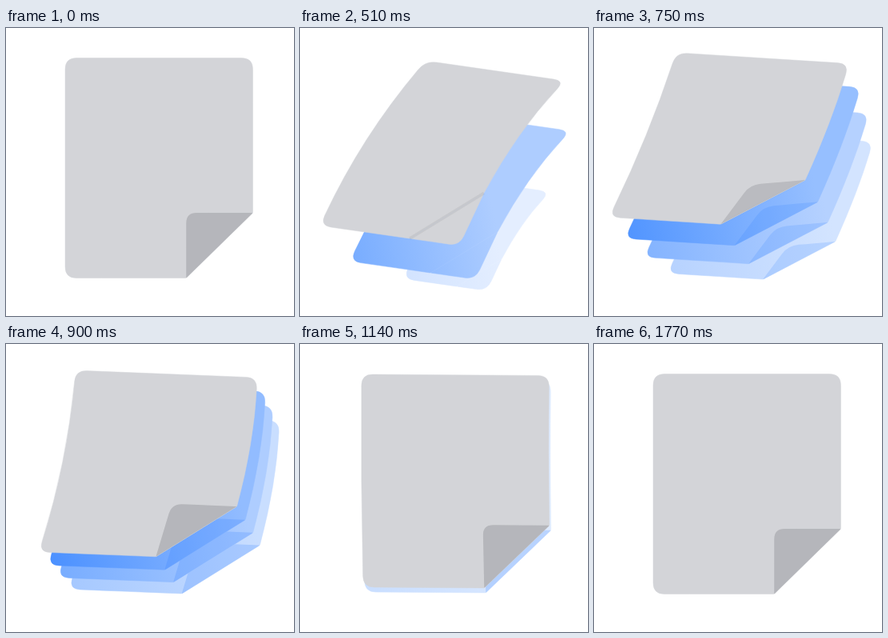
An HTML page with a canvas for the animation above (1800 ms loop, 360x360 px).

```html
<!DOCTYPE html>
<html lang="en">
<head>
<meta charset="utf-8">
<title>Peeling note</title>
<style>
  html, body { margin: 0; width: 100%; height: 100%; overflow: hidden; background: #fff; }
  canvas { display: block; width: 360px; height: 360px; }
</style>
</head>
<body>
<canvas id="stage"></canvas>
<script>
const LOOP = 1800, STEP = 30, COPIES = 3;
const GREY = [211, 212, 216], BLUE = [74, 144, 255];
const PIVOT = [170, 133];            // copies shrink around this point
const FOLD = { u: 0.645, v: 0.704 }; // where the peeled corner meets the edges

const canvas = document.getElementById('stage');
const ctx = canvas.getContext('2d');
const dpr = window.devicePixelRatio || 1;
canvas.width = canvas.height = 360 * dpr;
ctx.scale(dpr, dpr);

// A pose: three page corners, edge bend, peel of the fourth corner,
// and how the copies trail: gap, shrink and loss of colour per copy
const pose = (tl, tr, bl, bend, peel, gap, shrink, loss) =>
  [...tl, ...tr, ...bl, ...bend, peel, ...gap, shrink, loss];

const rest   = pose([74, 37.5], [308.5, 37.5], [74, 312.5], [0, 0], 1, [0, 0], 0, 1.25);
const flat   = pose([128, 292], [235, 305], [113, 318], [0, 0], 0, [0, 0], 0.1, 0.6);
const lift   = pose([157, 41], [331, 66], [25, 247], [-14, -8], 0, [23, 56], 0.1, 0.5);
const open   = pose([122, 30], [324, 48], [10, 227], [0, 0], 0.56, [21, 40], 0.035, 0.34);
const settle = pose([87, 33], [314, 42], [41, 260], [12, 2], 1, [11, 17], 0.004, 0.25);
const land   = pose([77, 38], [311.5, 39.5], [79, 304], [-2, 0], 1, [2, 6], 0, 0.95);

const keys = [[0, rest], [240, flat], [510, lift], [630, open],
              [900, settle], [1140, land], [1290, rest]];

const clamp = x => Math.max(0, Math.min(1, x));
const mix = (a, b, f) => a + (b - a) * f;

// Smooth interpolation that never passes beyond its keys
function poseAt(t) {
  const last = keys.length - 1;
  const slope = (k, i) => (keys[k + 1][1][i] - keys[k][1][i]) / (keys[k + 1][0] - keys[k][0]);
  const tangent = (k, i) => {
    if (k === 0 || k === last) return 0;
    const a = slope(k - 1, i), b = slope(k, i);
    return a * b > 0 ? 2 * a * b / (a + b) : 0;
  };
  let k = 0;
  while (k < last - 1 && t >= keys[k + 1][0]) k++;
  const [start, from] = keys[k], [end, to] = keys[k + 1];
  const span = end - start, u = clamp((t - start) / span);
  return from.map((a, i) => mix(a, to[i], u * u * (3 - 2 * u))
    + span * u * (1 - u) * ((1 - u) * tangent(k, i) - u * tangent(k + 1, i)));
}

const middle = (p, q, bend = [0, 0]) => p.map((c, i) => (c + q[i]) / 2 + bend[i]);

function toward(p, q, r) {
  const d = Math.hypot(q[0] - p[0], q[1] - p[1]) || 1;
  return p.map((c, i) => mix(c, q[i], Math.min(r / d, 0.8)));
}

// Closed outline with rounded corners; bends maps an edge index to its bow
function outline(points, radii, bends = {}) {
  const n = points.length;
  const controls = points.map((p, i) => middle(p, points[(i + 1) % n], bends[i]));
  ctx.beginPath();
  points.forEach((p, i) => {
    const before = controls[(i + n - 1) % n];
    const enter = toward(p, before, radii[i]);
    if (i) ctx.quadraticCurveTo(...before, ...enter);
    else ctx.moveTo(...enter);
    ctx.quadraticCurveTo(...p, ...toward(p, controls[i], radii[i]));
  });
  ctx.quadraticCurveTo(...controls[n - 1], ...toward(points[0], controls[n - 1], radii[0]));
  ctx.closePath();
}

const tint = strength => `rgb(${BLUE.map(c => mix(255, c, clamp(strength)))})`;

// Sheet 0 is the note; higher numbers are the copies trailing below it
function drawSheet(n, t) {
  const [tlx, tly, trx, try_, blx, bly, bendX, bendY, peel, gapX, gapY, shrink, loss] = poseAt(t);
  const strength = 1.25 - loss * n;
  const rise = n ? clamp((t - 330 - 30 * n * n) / 60) ** 3 : 1;
  if (n && (strength <= 0 || rise <= 0)) return;

  const scale = 1 - shrink * n * n;
  const gap = [gapX, gapY];
  // Page coordinates to stage; a copy unrolls upward from its lower edge
  const at = (u, v) => {
    const x = u * mix(0.75, 1, rise), y = 1 - (1 - v) * rise;
    const bow = 2 * y * (1 - y) * (1 + 0.4 * x);
    return [
      tlx + x * (trx - tlx) + y * (blx - tlx) + bow * bendX,
      tly + x * (try_ - tly) + y * (bly - tly) + bow * bendY
    ].map((c, i) => mix(PIVOT[i], c, scale) + gap[i] * n);
  };

  const bottomLeft = at(0, 1), right = at(1, FOLD.v), bottom = at(FOLD.u, 1);
  const tip = at(mix(1, FOLD.u, peel), mix(1, FOLD.v, peel));
  const bow = f => [bendX, bendY].map(c => c * f * scale * rise);

  let paint = `rgb(${GREY})`;
  if (n) {
    paint = ctx.createLinearGradient(...bottomLeft, ...right);
    paint.addColorStop(0, tint(strength));
    paint.addColorStop(1, tint(strength * 0.6));
  }
  const shade = n ? 'rgba(40,120,255,.2)' : 'rgba(0,0,10,.14)';

  ctx.fillStyle = ctx.strokeStyle = paint;
  ctx.lineWidth = 0.5;
  outline([at(0, 0), at(1, 0), right, bottom, bottomLeft], [14, 14, 1, 1, 14],
    { 1: bow(0.7), 4: bow(1) });
  ctx.fill();
  ctx.stroke();

  outline([right, tip, bottom], [1, 13, 1]);
  ctx.fill();
  ctx.stroke();
  ctx.globalAlpha = peel;
  ctx.fillStyle = shade;
  ctx.fill();

  if (!n) {
    ctx.globalAlpha = (1 - peel) * 0.4;
    ctx.strokeStyle = shade;
    ctx.lineWidth = 4;
    ctx.beginPath();
    ctx.moveTo(...right);
    ctx.lineTo(...bottom);
    ctx.stroke();
  }
  ctx.globalAlpha = 1;
}

function frame() {
  const t = Math.floor((performance.now() % LOOP) / STEP) * STEP;
  ctx.clearRect(0, 0, 360, 360);
  for (let n = COPIES; n >= 0; n--) drawSheet(n, t);
  requestAnimationFrame(frame);
}
frame();
</script>
</body>
</html>
```
